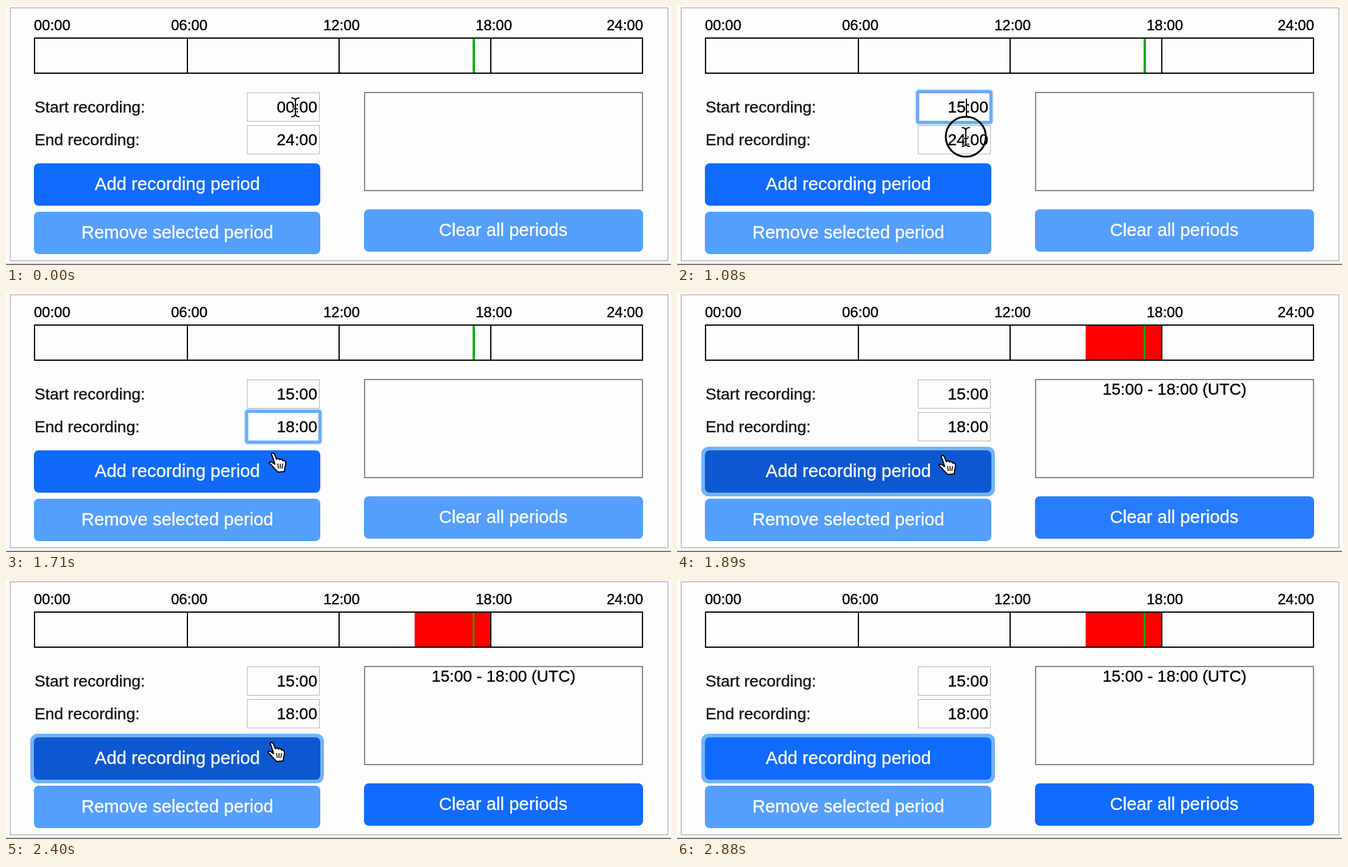
An HTML page for the animation above (2.91 s loop, 1096 by 428 pixels).

```html
<!DOCTYPE html>
<html lang="en">
<head>
<meta charset="utf-8">
<title>Recording periods</title>
<style>
  html, body { margin: 0; width: 100%; height: 100%; overflow: hidden; background: #fdfdfd; }
  svg { display: block; width: 1096px; height: 428px; }
  text { font: 26.67px "Liberation Sans", Arial, sans-serif; stroke: #000; stroke-width: .4; }
  .hour { font-size: 24px; }
  .label { fill: #151515; stroke: #151515; }
  .btn { font-size: 29.33px; fill: #fdfdfd; stroke: #fdfdfd; text-anchor: middle; }
  .value { text-anchor: end; }
  .line { fill: none; stroke-width: 2; }
</style>
</head>
<body>
<svg viewBox="0 0 1096 428">
  <rect class="line" x="7" y="3" width="1084" height="418" stroke="#c6c6c6"/>
  <rect y="426" width="1096" height="2" fill="#777"/>

  <g id="hours"></g>
  <rect id="period" x="673.5" y="53" width="125.5" height="58" fill="#f00"/>
  <path class="line" d="M47 53H1049V111H47ZM299 53V111M549 53V111M799 53V111" stroke="#000"/>
  <rect id="now" x="769" y="54" height="56"/>

  <text class="label" x="47" y="176">Start recording:</text>
  <text class="label" x="47" y="230">End recording:</text>
  <g fill="#fefefe" stroke="#b2b2b2">
    <rect x="397.5" y="143.5" width="119" height="47"/>
    <rect x="397.5" y="197.5" width="119" height="47"/>
  </g>
  <g id="focus" fill="none" stroke="#6cacf8">
    <rect x="396" y="141" width="122" height="52" rx="3" stroke-width="8" opacity=".3"/>
    <rect x="396.5" y="141.5" width="121" height="51" rx="2" stroke-width="5"/>
  </g>
  <text id="start" class="value" x="513" y="176"></text>
  <text id="end" class="value" x="513" y="230"></text>
  <rect id="caret" x="476" y="153" width="2" height="29"/>

  <rect class="line" x="591" y="143" width="458" height="162" stroke="#858585"/>
  <text id="entry" x="820" y="168" text-anchor="middle">15:00 - 18:00 (UTC)</text>

  <rect id="ring" x="40" y="254" width="484" height="82" rx="12" fill="#74b2fa"/>
  <rect id="add" x="46" y="260" width="472" height="70" rx="8"/>
  <rect x="46" y="340" width="472" height="70" rx="8" fill="#559fff"/>
  <rect id="clear" x="590" y="336" width="460" height="70" rx="8"/>
  <text class="btn" x="282.5" y="304">Add recording period</text>
  <text class="btn" x="282.5" y="384">Remove selected period</text>
  <text class="btn" x="819.5" y="380">Clear all periods</text>

  <circle id="click" r="33" fill="none" stroke="#000" stroke-width="3"/>
  <g id="beam" fill="none" stroke-linecap="round">
    <path d="M-6-15Q0-15 0-10Q0-15 6-15M0-10V10M-6 16Q0 16 0 10Q0 16 6 16M-3 3H3" stroke="#fdfdfd" stroke-width="4"/>
    <path d="M-6-15Q0-15 0-10Q0-15 6-15M0-10V10M-6 16Q0 16 0 10Q0 16 6 16M-3 3H3" stroke="#000" stroke-width="2"/>
  </g>
  <g id="arrow" stroke="#fdfdfd" stroke-width="2" stroke-linejoin="round">
    <path d="M1 2V29L7 23L12 35L17 33L12 21H20Z" fill="#777" stroke="none" opacity=".3"/>
    <path d="M0 0V27L6 21.500L11 33L16 31L11 19.500H19Z"/>
  </g>
  <g id="hand" fill="#fdfdfd" stroke="#000" stroke-width="2" stroke-linejoin="round">
    <path d="M3 15L0 6C-2 3-2 1 0 .5C2.500 0 3.500 2 4 3.500L7 11C8 9 11 9 12 11.500C13 10 16 10 17 13C18 12 21 12.500 22 16C22.500 20 21 23 20.500 25L20 31L9 32C7 29 3 26 0 22C-2 20-4 18.500-5 17C-5.500 15-2 14 0 16L4 19Z"/>
    <path d="M9 18L10 26M13 18V26M17 18L16 26" stroke-width="1.500"/>
  </g>
</svg>
<script>
const LOOP = 2910, STEP = 30;
const el = id => document.getElementById(id);
const show = (id, on) => el(id).setAttribute("visibility", on ? "visible" : "hidden");
const place = (id, x, y) => el(id).setAttribute("transform", `translate(${x} ${y})`);
const ramp = (t, a, b) => Math.min(1, Math.max(0, (t - a) / (b - a)));
const ease = p => p * p * (3 - 2 * p);
const mix = (a, b, p) => `rgb(${a.map((v, i) => Math.round(v + (b[i] - v) * p))})`;

const BLUE = [17, 107, 255], LIGHT = [85, 159, 255], DEEP = [13, 88, 208];

// time, pointer x, pointer y
const path = [
  [0, 477, 167], [240, 477, 167], [480, 735, 268], [780, 735, 268],
  [1020, 476, 216], [1410, 476, 216], [1710, 439, 264], [1800, 437, 268]
];
const clicks = [[90, 180], [1050, 1140], [1800, 1890]];
const startText = [[0, "00:00"], [600, "10:00"], [720, "15:00"]];
const endText = [[0, "24:00"], [1260, "14:00"], [1380, "18:00"]];

[["00:00", 46], ["06:00", 272], ["12:00", 523], ["18:00", 774], ["24:00", 990]].forEach(([s, x]) => {
  el("hours").insertAdjacentHTML("beforeend", `<text class="hour" x="${x}" y="40">${s}</text>`);
});

function pointer(t) {
  const i = path.findIndex(p => p[0] > t);
  if (i < 0) return path[path.length - 1].slice(1);
  const [a, x, y] = path[i - 1], [b, u, v] = path[i];
  const p = ease(ramp(t, a, b));
  return [x + (u - x) * p, y + (v - y) * p];
}

const valueAt = (table, t) => table.filter(r => r[0] <= t).pop()[1];

function render(t) {
  const [x, y] = pointer(t);
  const overField = x > 397 && x < 517 && y > 143 && y < 245;
  const overAdd = x > 46 && x < 518 && y > 259 && y < 330;
  const kind = t >= 2640 ? "" : overField ? "beam" : overAdd ? "hand" : "arrow";
  for (const id of ["beam", "arrow", "hand"]) {
    show(id, id === kind);
    place(id, x, y);
  }
  show("click", clicks.some(([a, b]) => t >= a && t < b));
  place("click", x, y);

  const added = t >= 1860, second = t >= 1110;
  const focused = t >= 150 && !added;
  show("focus", focused);
  place("focus", 0, second ? 54 : 0);
  show("caret", focused && t < 1620);
  place("caret", 0, second ? 54 : 0);
  el("start").textContent = valueAt(startText, t);
  el("end").textContent = valueAt(endText, t);

  for (const id of ["period", "entry", "ring"]) show(id, added);
  el("now").setAttribute("fill", added ? "#2f9a0d" : "#0cae0c");
  el("now").setAttribute("width", added ? 3 : 4);
  const hover = ramp(t, 1680, 1860) - ramp(t, 2640, 2820);
  el("add").setAttribute("fill", mix(BLUE, DEEP, ease(hover)));
  el("clear").setAttribute("fill", mix(LIGHT, BLUE, ramp(t, 1830, 1920)));
}

const t0 = performance.now();
function tick() {
  const t = (performance.now() - t0) % LOOP;
  render(Math.floor(t / STEP) * STEP);
  requestAnimationFrame(tick);
}
tick();
</script>
</body>
</html>
```
